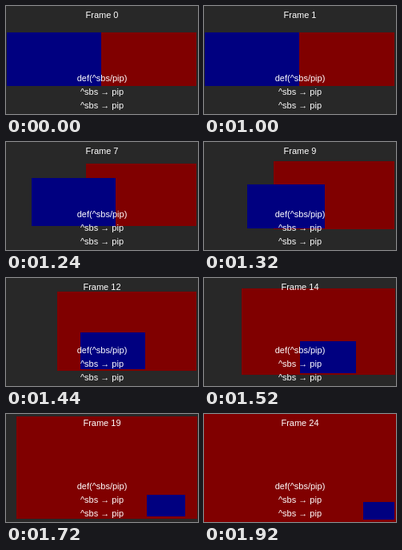
Write an HTML page that moves like this. It is 240 by 135 pixels and loops after 2.92 s.

```html
<!DOCTYPE html>
<html lang="en">
<head>
<meta charset="utf-8">
<title>Side by side to picture in picture</title>
<style>
  html, body { margin: 0; width: 100%; height: 100%; overflow: hidden; background: #282828; }
  svg { display: block; width: 100%; height: 100%; }
  text { font: 11px "Liberation Sans", Arial, sans-serif; fill: #fff; text-anchor: middle; }
</style>
</head>
<body>
<svg viewBox="0 0 240 135">
  <rect id="red" fill="#800000" shape-rendering="crispEdges"/>
  <rect id="blue" fill="#000080" shape-rendering="crispEdges"/>
  <text id="counter" x="120" y="15"></text>
  <text x="120" y="94">def(^sbs/pip)</text>
  <text x="120" y="111">^sbs → pip</text>
  <text x="120" y="128">^sbs → pip</text>
</svg>
<script>
  const LOOP = 2920, HOLD = 1000, STEP = 40, LAST = 24;

  // Each pane moves between two boxes: left, top, right, bottom.
  const panes = [
    { el: document.getElementById('red'), from: [119.9, 33, 238, 100], to: [0, 0, 240, 135] },
    { el: document.getElementById('blue'), from: [1, 33, 119, 100], to: [199, 110, 238, 132] }
  ];
  const counter = document.getElementById('counter');
  const easeSine = p => (1 - Math.cos(Math.PI * p)) / 2;

  function placePane({ el, from, to }, amount) {
    const [left, top, right, bottom] = from.map((a, i) => Math.floor(a + (to[i] - a) * amount));
    const box = { x: left, y: top, width: right - left, height: bottom - top };
    for (const name in box) el.setAttribute(name, box[name]);
  }

  function draw(now) {
    const t = now % LOOP;
    const frame = t < HOLD ? 0 : Math.min(LAST, 1 + Math.floor((t - HOLD) / STEP));
    const amount = easeSine(Math.max(0, frame - 1) / (LAST - 1));
    panes.forEach(pane => placePane(pane, amount));
    counter.textContent = `Frame ${frame}`;
  }

  const start = performance.now();
  function tick() {
    draw(performance.now() - start);
    requestAnimationFrame(tick);
  }
  tick();
</script>
</body>
</html>
```
